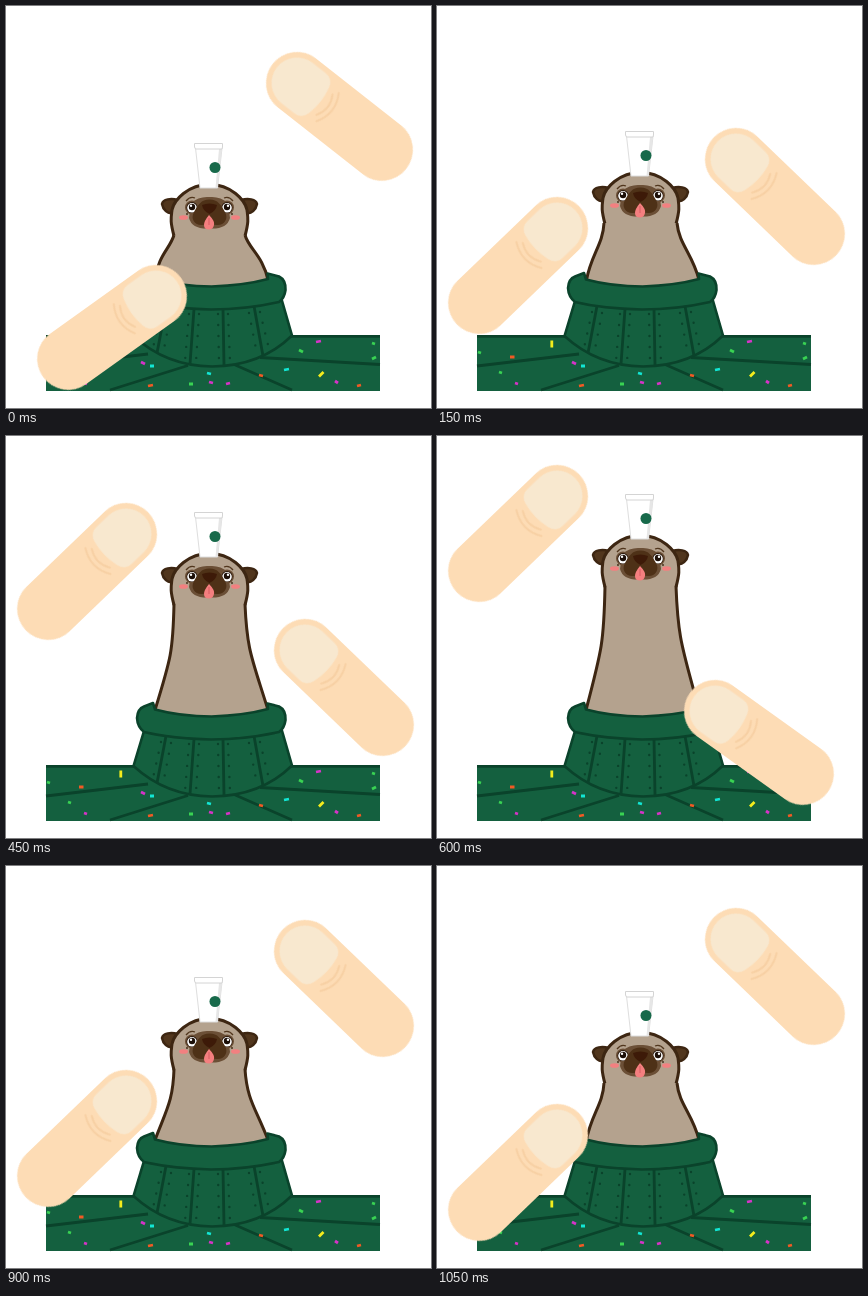
These frames come from a looping animation (425x402 px, 1200 ms). An HTML page without scripts:

```html
<!DOCTYPE html>
<html lang="en">
<head>
<meta charset="utf-8">
<title>Stretchy pug</title>
<style>
  @property --rise { syntax: "<number>"; inherits: true; initial-value: 0; }

  html, body { margin: 0; width: 100%; height: 100%; overflow: hidden; background: #fff; }
  svg { display: block; width: 100%; height: 100%; }

  .pug, .neck, .finger { animation: 1200ms step-end infinite; }
  .pug { animation-name: stretch; }
  .head { transform: translateY(calc(var(--rise) * -1px)); }
  .neck {
    animation-name: slim;
    transform: translateY(274px) scaleY(calc(1 + var(--rise) / 45));
  }
  .right { animation-name: right; }
  .left { animation-name: left; }

  @keyframes stretch {
    0%, 100% { --rise: 0; }
    12.5%, 87.5% { --rise: 12; }
    25%, 75% { --rise: 26; }
    37.5%, 62.5% { --rise: 61; }
    50% { --rise: 79; }
  }
  /* the flare straightens as the neck grows */
  @keyframes slim {
    0%, 100% { d: path("M168-45C164-31 151-24 150 0V8H262V0C257-24 243-31 239-45"); }
    12.5%, 87.5% { d: path("M167-45C166-28 154-20 149.5 0V8H262V0C256-20 242-28 240-45"); }
    25%, 75% { d: path("M168-45C167-25 161-20 149 0V8H262V0C250-20 241-25 239-45"); }
    37.5% { d: path("M168-45C167-25 165-22 149 0V8H262V0C246-22 241-25 239-45"); }
  }
  @keyframes right {
    0%, 100% { transform: translate(291px, 77px) rotate(38.2deg); }
    12.5% { transform: translate(299px, 153px) rotate(43.9deg); }
    25% { transform: translate(299px, 183px) rotate(43.9deg); }
    37.5% { transform: translate(299px, 214px) rotate(43.9deg); }
    50% { transform: translate(278px, 275px) rotate(35.6deg); }
    62.5% { transform: translate(299px, 152px) rotate(43.9deg); }
    75% { transform: translate(299px, 85px) rotate(43.9deg); }
    87.5% { transform: translate(299px, 73px) rotate(43.9deg); }
  }
  /* runs inside a mirrored group */
  @keyframes left {
    0%, 100% { transform: translate(269px, 290px) rotate(35.6deg); }
    12.5% { transform: translate(299px, 222px) rotate(43.9deg); }
    25% { transform: translate(299px, 160px) rotate(43.9deg); }
    37.5%, 62.5% { transform: translate(299px, 98px) rotate(43.9deg); }
    50% { transform: translate(299px, 60px) rotate(43.9deg); }
    75% { transform: translate(299px, 235px) rotate(43.9deg); }
    87.5% { transform: translate(299px, 269px) rotate(43.9deg); }
  }

  .fur { fill: #b4a28e; stroke: #3d2612; stroke-width: 3; }
  .knit { fill: #14603f; stroke: #0a432b; stroke-width: 2.6; stroke-linejoin: round; }
  .seam { fill: none; stroke: #0a432b; stroke-width: 2.8; }
  .stitch { fill: none; stroke: #0a432b; stroke-width: 2.4; stroke-linecap: round; stroke-dasharray: 0 11; }
  .confetti { stroke-width: 2.8; }
</style>
</head>
<body>
<svg viewBox="0 0 425 402">
  <defs>
    <g id="finger">
      <rect x="-31" y="-31" width="170" height="62" rx="31" fill="#fddcb5"/>
      <path d="M0-25.500H16Q26-25.500 28-16Q32 0 28 16Q26 25.500 16 25.500H0A25.500 25.500 0 0 1 0-25.500Z" fill="#f8e8cf"/>
      <path d="M35-13Q43 0 35 13M39-18Q50 0 39 18" fill="none" stroke="#f7d0a4" stroke-width="2" stroke-linecap="round"/>
    </g>
    <path id="ear" d="M172 194C165 192 157 193 156 198C157 204 162 208 166 207C166 202 168 198 172 194Z"
      fill="#51361d" stroke="#3d2612" stroke-width="2.500" stroke-linejoin="round"/>
    <g id="eye">
      <path d="M180 195Q184 190 189 192" fill="none" stroke="#51361d" stroke-width="1.300"/>
      <circle cx="186" cy="201.500" r="7" fill="#6b4f36"/>
      <circle cx="186" cy="201.500" r="5.500" fill="#2a180c"/>
      <circle cx="186" cy="201.800" r="4.800" fill="#fff"/>
      <circle cx="186" cy="201" r="3.200" fill="#1c0f08"/>
      <circle cx="185" cy="199.800" r="1.200" fill="#fff"/>
      <circle cx="181" cy="208" r=".9" fill="#3d2612"/>
      <ellipse cx="177.500" cy="211.500" rx="4.500" ry="2.300" fill="#f28080"/>
    </g>
  </defs>

  <!-- blanket -->
  <path d="M40 329H374V385H40Z" fill="#14603f"/>
  <path class="seam" d="M40 330.400H374M40 360L142 348M104 384L182 359.500M227 358L286 384M254 351.500L374 358.500"/>
  <g class="confetti">
    <path stroke="#f4ec1c" d="M114.800 334.500v7M313 370.500l4.500-4.500"/>
    <path stroke="#f15a24" d="M73 351h4.500M142 380l5-1M253 369l4 1M351 380l4-1"/>
    <path stroke="#d633c8" d="M135 356l4 2M78 377l3 1M203 376l4 1M220 378l4-1M310 336l5-1M329 375l3 2"/>
    <path stroke="#12e6d4" d="M144 360h4M201 367l4 1M278 364l5-1"/>
    <path stroke="#39d353" d="M62 366l3 1M183 378h4M293 344l4 2M366 353l4-2M366 337l3 1M41 346l3 1"/>
  </g>

  <!-- sweater body -->
  <path class="knit" d="M138 295L127.500 330Q160 360 206 360.500Q255 360 286 329.500L275.500 293Z"/>
  <path class="seam" d="M160 300L151 347M188 303L184 358M217 303L218 359M248 300L257 350"/>
  <path class="stitch" d="M155 306L147 342M165 307L157 348M183 308L179 355M193 308L190 356M212 308L213 356M222 308L224 355M243 307L251 348M254 306L263 343"/>

  <g class="pug">
    <g class="head">
      <use href="#ear"/>
      <use href="#ear" transform="translate(407) scale(-1 1)"/>
      <path class="fur" d="M168 230C164 215 165 212 166 204C168 194 182 178.500 203.500 178.500C225 178.500 239 194 241 204C242 212 243 215 239 230"/>
    </g>
    <path class="neck fur" vector-effect="non-scaling-stroke"/>
    <g class="head">
      <path d="M185 197Q193 190 203.500 191Q214 190 222 197L224 212Q221 223.500 203.500 222.500Q186 223.500 183 212Z" fill="#6b4f36"/>
      <use href="#eye"/>
      <use href="#eye" transform="translate(407) scale(-1 1)"/>
      <path d="M203.500 193.500C212 193.500 215 199 219 206C223 213 218 219.500 211 219Q206 219 203.500 215Q201 219 196 219C189 219.500 184 213 188 206C192 199 195 193.500 203.500 193.500Z" fill="#4e3117"/>
      <path d="M203 209Q209 215 208 219Q207 223.500 203 223.500Q198 223.500 198 219Q198 215 203 209Z" fill="#f47f7f"/>
      <path d="M203 212V219" stroke="#d85c62"/>
      <path d="M196 199Q203.500 196 211 199Q210 205 203.500 208Q197 205 196 199Z" fill="#3d1a08"/>
      <path d="M189.500 142H216L211.500 182H194Z" fill="#fff" stroke="#dedede"/>
      <path d="M213 143H216L211.500 182H209.500Z" fill="#e6e6e6"/>
      <path d="M188.500 137.500H216.500V141L216 143H189.500L188.500 141Z" fill="#fff" stroke="#d4d4d4"/>
      <circle cx="209" cy="161.500" r="5.500" fill="#17694a"/>
    </g>
  </g>

  <!-- collar -->
  <path class="knit" d="M147 267L149 273.500Q175 280.500 205.500 280.500Q238 279.500 262 273L261.500 267.500L273 270.500Q280 274 279.500 284Q278.500 292 273 296Q240 303.500 205 303.500Q165 302.500 138 296Q131.500 291 131 282Q131.500 273 138 270.500Z"/>

  <use class="finger right" href="#finger"/>
  <g transform="translate(419) scale(-1 1)">
    <use class="finger left" href="#finger"/>
  </g>
</svg>
</body>
</html>
```
